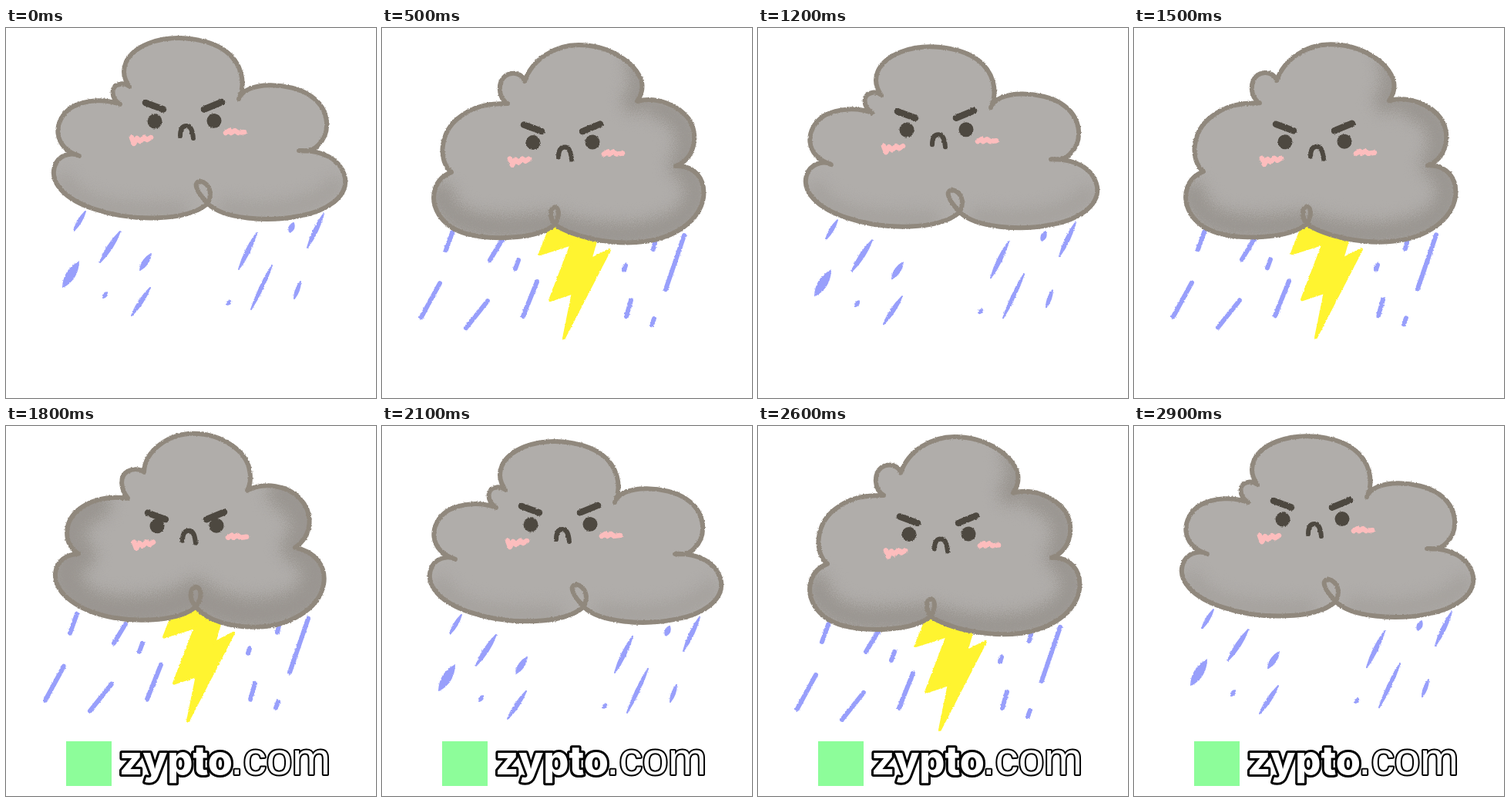
Recreate the animation shown at these times as an HTML page. Size 480 by 480 pixels, loop 3 s.

```html
<!DOCTYPE html>
<html lang="en">
<head>
<meta charset="utf-8">
<title>Storm cloud</title>
<style>
  html, body { margin: 0; width: 100%; height: 100%; overflow: hidden; background: #fff; }
  svg { display: block; width: 480px; height: 480px; }
  .cloud { fill: #b0adaa; }
  .line, .shade, .ink, .blush, .drops { fill: none; stroke-linecap: round; stroke-linejoin: round; }
  .line { stroke: #90887d; stroke-width: 6; }
  .shade { stroke: #8d8882; }
  .ink { stroke: #4d4840; }
  .blush { stroke: #fdbdbd; stroke-width: 6.5; }
  .drops { stroke: #989ffb; stroke-width: 6; }
  .lens { fill: #989ffb; stroke: #989ffb; stroke-width: 2; stroke-linejoin: round; }
  .bolt { fill: #fff430; stroke: #fff430; stroke-width: 4; stroke-linejoin: round; }
  text { fill: #fff; stroke: #000; stroke-linejoin: round; paint-order: stroke; }
  .bold { font: 800 52px Inter, Arial, sans-serif; stroke-width: 6px; }
  .thin { font: 60px "Liberation Sans", Arial, sans-serif; stroke-width: 4px; }
</style>
</head>
<body>
<svg viewBox="0 0 480 480">
  <defs>
    <filter id="rough" filterUnits="userSpaceOnUse" x="-30" y="-30" width="540" height="540" color-interpolation-filters="sRGB">
      <feTurbulence type="fractalNoise" baseFrequency=".45" numOctaves="2" seed="4"/>
      <feDisplacementMap in="SourceGraphic" scale="2.6" xChannelSelector="R" yChannelSelector="G"/>
    </filter>
    <filter id="spray" filterUnits="userSpaceOnUse" x="-30" y="-30" width="540" height="540" color-interpolation-filters="sRGB">
      <feGaussianBlur in="SourceGraphic" stdDeviation="9" result="soft"/>
      <feTurbulence type="fractalNoise" baseFrequency=".8" numOctaves="2" seed="7"/>
      <feDisplacementMap in="soft" scale="26" xChannelSelector="R" yChannelSelector="G"/>
    </filter>
  </defs>
  <g id="stage"></g>
  <g id="sign">
    <rect x="78" y="409" width="59" height="58" fill="#8dfd9a"/>
    <text class="bold" x="147" y="452">zypto</text>
    <text class="thin" x="291" y="452">.com</text>
  </g>
</svg>
<script>
const LOOP = 3000, STEP = 100, BOB = 960, DROP = 22.5, SIGN_AT = 1700;

const wide = {
  body: 'M260 229C235 250 165 252 115 235C75 222 57 200 63 180C67 165 85 160 95 166C60 155 60 120 85 103' +
    'C105 92 130 92 148 99C135 90 136 75 147 73C152 71 158 74 160 76C145 55 155 32 185 20C215 8 260 12 285 30' +
    'C305 45 312 70 302 92C310 68 370 70 395 88C420 105 422 135 405 152C398 160 388 160 380 159' +
    'C410 158 435 170 440 195C443 220 415 238 380 244C340 252 282 248 262 228',
  curl: 'M260 229C266 222 267 210 260 203C253 196 245 199 247 206C249 215 256 221 262 228',
  shade: 'M75 200C95 235 150 240 225 238M285 235C330 242 400 238 428 205',
  width: 24, tone: .3
};
const heavy = {
  body: 'M224 255C200 275 140 275 110 267C75 257 62 230 69 208C73 196 82 190 90 187C72 172 75 135 100 116' +
    'C120 100 140 98 163 98C150 90 150 70 160 62C170 55 183 60 185 69C195 40 225 22 255 22' +
    'C295 22 330 45 337 70C339 82 335 88 331 95C355 88 385 100 398 118C412 140 405 170 381 179' +
    'C405 178 420 195 417 220C412 250 380 272 340 277C300 282 250 272 224 255',
  curl: 'M224 255C215 242 220 232 224 233C229 232 232 242 224 255',
  shade: 'M76 215C85 262 150 264 222 254C280 275 380 278 406 228C412 195 398 188 388 178C405 150 400 115 360 102M332 45C340 60 338 80 328 95',
  width: 32, tone: .62
};
const round = {
  body: 'M246 232C225 250 175 252 140 246C95 238 62 215 64 188C66 172 78 164 94 163C74 150 74 122 95 105' +
    'C112 92 135 88 158 91C148 78 147 62 158 56C166 52 174 53 179 57C180 30 210 7 243 7' +
    'C280 7 312 30 316 55C318 65 316 75 313 81C335 69 366 75 381 91C400 111 397 140 375 155' +
    'C402 160 416 180 412 203C406 235 366 259 320 258C290 258 262 250 246 232',
  curl: 'M246 232C236 220 239 207 246 206C253 206 256 220 246 232',
  shade: 'M115 98C72 122 78 150 95 165C62 180 76 218 120 234C170 244 220 234 246 216C275 242 340 251 385 226C420 195 400 165 378 155C398 135 392 105 360 84',
  width: 42, tone: .62
};

// x1, y1, x2, y2 and, for brushed drops, the thickness
const brushed = [
  [103, 238, 88, 263, 5], [148, 264, 122, 304, 7], [188, 293, 174, 314, 8], [94, 304, 74, 336, 13],
  [131, 343, 126, 350, 5], [187, 337, 163, 373, 6], [291, 354, 287, 359, 5], [325, 266, 302, 313, 6],
  [373, 253, 368, 265, 7], [412, 241, 391, 285, 6], [345, 308, 318, 365, 5], [382, 329, 374, 351, 5]
];
const straight = [
  [92, 241, 83, 266], [155, 254, 140, 279], [177, 279, 173, 290], [75, 309, 51, 353],
  [137, 332, 109, 367], [201, 307, 183, 352], [355, 252, 352, 265], [316, 286, 314, 292],
  [392, 247, 368, 317], [323, 331, 317, 352], [353, 355, 350, 363]
];

const path = (cls, d, extra = '') => `<path class="${cls}" d="${d}" ${extra}/>`;
const move = (x, y, inner) => `<g transform="translate(${x} ${y})">${inner}</g>`;
const rough = inner => `<g filter="url(#rough)">${inner}</g>`;

function lens([x1, y1, x2, y2, w]) {
  const len = Math.hypot(x2 - x1, y2 - y1);
  const nx = (y2 - y1) / len * w * .8, ny = (x1 - x2) / len * w * .8;
  const mx = (x1 + x2) / 2, my = (y1 + y2) / 2;
  return `M${x1} ${y1}Q${mx + nx} ${my + ny} ${x2} ${y2}Q${mx - nx} ${my - ny} ${x1} ${y1}Z`;
}
const brushRain = path('lens', brushed.map(lens).join(''));
const lineRain = path('drops', straight.map(([a, b, c, d]) => `M${a} ${b}L${c} ${d}`).join(''));
const bolt = path('bolt', 'M222 228L205 271L246 258L218 331L248 321L236 380L295 266L270 279L281 240Z');

function face(x, y, brow) {
  const eye = (cx, cy) => `<circle cx="${cx}" cy="${cy}" r="9.5" fill="#4d4840"/>`;
  return move(x, y,
    path('ink', `M181 ${97 + brow}L204 ${105.5 + brow}M257 ${105.5 + brow}L280 ${96 + brow}`, 'stroke-width="8.5"') +
    eye(193, 121) + eye(270, 120.5) +
    path('ink', 'M226 140C226 131 229 127 234 127C240 127 242 133 243 143', 'stroke-width="6"') +
    path('blush', 'M163 142l3 8l4-7l4 4l5-5l4 3l5-3M285 136l5-3l2 3l5-3l4 3l8-1'));
}

function cloud(art, id) {
  return `<clipPath id="${id}"><path d="${art.body}Z"/></clipPath>` +
    rough(path('cloud', art.body + 'Z')) +
    `<g clip-path="url(#${id})">` +
    path('shade', art.shade, `stroke-width="${art.width}" opacity="${art.tone}" filter="url(#spray)"`) + '</g>' +
    rough(path('line', art.body + art.curl));
}

// base: bob height at which the drawing sits unshifted; until: end of its share of the bob
const poses = [
  { until: .36, base: 0, art: rough(brushRain) + cloud(wide, 'c0') + rough(face(0, 0, 0)) },
  { until: .48, base: .6, art: rough(brushRain + move(0, -3, bolt)) + move(0, -4, cloud(round, 'c1')) + rough(face(1, -1.5, 8.5)) },
  { until: .74, base: 22.3, art: rough(move(0, 22, lineRain + bolt)) + cloud(heavy, 'c2') + rough(face(3, 27.5, 1)) },
  { until: 1, base: .6, art: rough(lineRain + bolt) + cloud(round, 'c3') + rough(face(3, 6, 7)) }
];

const stage = document.getElementById('stage');
const sign = document.getElementById('sign');
stage.innerHTML = poses.map(p => `<g>${p.art}</g>`).join('');
poses.forEach((p, i) => p.node = stage.children[i]);

function draw(time) {
  const t = Math.floor(time % LOOP / STEP) * STEP;
  const phase = t % BOB / BOB;
  const y = DROP * (1 - Math.cos(2 * Math.PI * phase)) / 2;
  const now = poses.find(p => phase < p.until);
  for (const p of poses) p.node.style.display = p === now ? '' : 'none';
  now.node.setAttribute('transform', `translate(0 ${(y - now.base).toFixed(1)})`);
  sign.style.display = t >= SIGN_AT ? '' : 'none';
}

let start;
function tick() {
  const now = performance.now();
  start ??= now;
  draw(now - start);
  requestAnimationFrame(tick);
}
draw(0);
requestAnimationFrame(tick);
</script>
</body>
</html>
```
